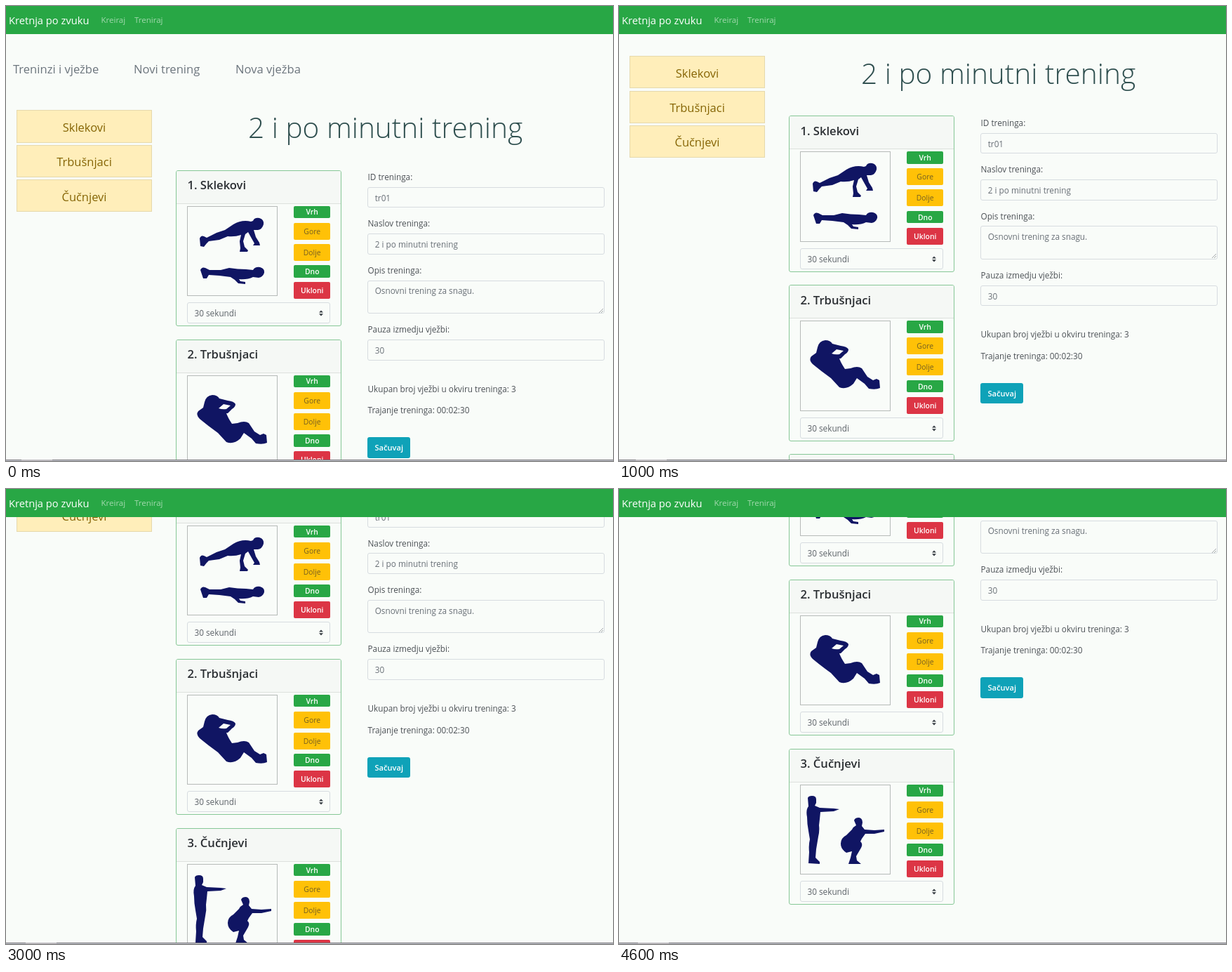
An HTML page for the animation above (5000 ms loop, 865 px wide and 648 px high).

```html
<!DOCTYPE html>
<html lang="hr">
<head>
<meta charset="utf-8">
<title>Trening</title>
<style>
  html, body { margin: 0; width: 100%; height: 100%; overflow: hidden; background: #f9fcf9; }
  #stage { position: absolute; left: 0; top: 0; width: 865px; height: 648px; overflow: hidden;
    font: 11.78px/20px "Open Sans", "Noto Sans", sans-serif; color: #4c5156; }
  #stage div { position: absolute; box-sizing: border-box; white-space: nowrap; }
  #page { left: 0; top: 0; width: 865px; height: 900px; }
  #nav { left: 0; top: 0; width: 865px; height: 40px; background: #28a745; }
  #line { left: 0; top: 646px; width: 865px; height: 2px; background: #c6c9d0; border-top: 1px solid #77747b; }
  #thumb { top: 646px; width: 44px; height: 2px; background: #bdbabf; }
  .brand { font-size: 14.7px; color: #fff; }
  .link { font-size: 11.5px; color: #a2d9ae; }
  .tab { font-size: 16.6px; color: #6c757d; }
  .title { font-size: 40.6px; font-weight: 300; color: #2f4f4f; }
  .pick { background: #ffeeba; border: 1px solid #e6d9ac; }
  .pickText { width: 193px; text-align: center; font-size: 16.5px; color: #856404; }
  .card { border: 1px solid #86c796; border-radius: 3px; background: #f9fcf9; }
  .head { background: #f5f8f5; border-bottom: 1px solid #dde1dd; border-radius: 2px 2px 0 0; }
  .name { font-size: 16.6px; font-weight: 600; color: #2b2f33; }
  .pic { border: 1px solid #b6bab8; }
  .pic svg { position: absolute; left: -1px; top: -1px; fill: #101563; }
  .btn { border-radius: 2px; }
  .btnText { width: 52.4px; text-align: center; font-size: 10.4px; }
  .field { border: 1px solid #d7dce0; border-radius: 3px; }
  .value { color: #697077; }
  .save { background: #0fa2b8; border-radius: 3px; }
  .saveText { width: 61px; text-align: center; font-size: 11.1px; font-weight: 600; color: #fff; }
</style>
</head>
<body>
<div id="stage">
  <div id="page"></div>
  <div id="nav"></div>
  <div id="line"></div>
  <div id="thumb"></div>
</div>
<script>
const page = document.getElementById('page');
const nav = document.getElementById('nav');
const thumb = document.getElementById('thumb');

function box(parent, cls, x, y, w, h) {
  const el = document.createElement('div');
  el.className = cls;
  Object.assign(el.style, { left: x + 'px', top: y + 'px', width: w + 'px', height: h + 'px' });
  parent.append(el);
  return el;
}

// y is the vertical middle of the line
function text(parent, cls, x, y, str) {
  const el = document.createElement('div');
  el.className = cls;
  el.textContent = str;
  Object.assign(el.style, { left: x + 'px', top: y - 10 + 'px' });
  parent.append(el);
  return el;
}

const svg = (w, h, d) =>
  `<svg width="${w}" height="${h}" viewBox="0 0 ${w} ${h}"><path fill-rule="evenodd" d="${d}"/></svg>`;

const pushUp =
  'M18 46Q20 41 24 43L28 45L42 38L54 34L66 26Q78 19 91 22L94 21Q96 16 103 17Q110 19 109 26' +
  'Q107 33 101 34L95 34L98 44L103 52L104 56L94 56L96 53L92 46L87 37L83 40L80 50L82 58L87 63L86 65' +
  'L75 65L76 60L75 50L77 41Q68 44 58 43L46 48L31 50L28 53L24 58L19 57Z' +
  'M19 91Q21 86 26 88L32 91L48 91L60 88Q72 90 84 90L94 91Q97 86 104 87Q111 89 110 95' +
  'Q108 101 102 102L94 101Q86 105 74 104L76 107L83 108L83 111L73 110L68 105L62 101L46 99' +
  'L31 98L28 103L23 103Z';
const sitUp =
  'M25 38Q27 29 36 28Q43 28 46 33L58 36Q67 37 69 41Q69 45 64 48L58 54L56 54Q58 60 64 69' +
  'L72 68Q82 64 88 68L96 80L104 85L109 83L113 85L114 96Q108 99 98 97L92 90L81 82L76 90' +
  'Q66 99 56 95L44 82Q30 72 18 62Q12 56 16 51L23 46ZM45 47L52 41L62 43L56 48Q50 49 45 47Z';
const squat =
  'M11 19Q12 16 17 16Q23 16 23 21L23 26L21 30L28 33L48 34L56 35L48 38L29 39Q28 50 27 58' +
  'Q28 66 26 74L23 92L22 104L28 110L28 113L12 112L13 96Q12 86 14 78L12 66Q10 56 10 46Q8 36 12 31Z' +
  'M77 51Q78 47 84 47Q89 48 89 54L88 59L92 64L106 65L120 64L120 67L106 70L93 70L88 77L86 81' +
  'Q90 84 87 90L80 102L81 108L87 113L69 113L72 104L74 95L66 97Q58 92 58 84Q58 76 66 72L74 64Q76 60 80 58Z';

const exercises = [['Sklekovi', pushUp], ['Trbušnjaci', sitUp], ['Čučnjevi', squat]];

// label, top, height, background, text colour, weight
const buttons = [
  ['Vrh', 51, 17.5, '#28a745', '#fff', 600],
  ['Gore', 75, 24, '#ffc107', '#755f22', 400],
  ['Dolje', 105, 24, '#ffc107', '#755f22', 400],
  ['Dno', 135.5, 17.5, '#28a745', '#fff', 600],
  ['Ukloni', 159.5, 24, '#dc3545', '#fff', 600]
];

function addCard(i, [name, figure]) {
  const x = 242, y = 233.6 + 241 * i;
  box(page, 'card', x, y, 236, 222.7);
  box(page, 'head', x + 1, y + 1, 234, 47);
  text(page, 'name', x + 16.5, y + 21.6, `${i + 1}. ${name}`);
  box(page, 'pic', x + 15.5, y + 51, 129, 128.6).innerHTML = svg(129, 128, figure);
  for (const [label, top, h, bg, color, weight] of buttons) {
    box(page, 'btn', x + 168, y + top, 52.4, h).style.background = bg;
    const t = text(page, 'btnText', x + 168, y + top + h / 2, label);
    t.style.color = color;
    t.style.fontWeight = weight;
  }
  const select = box(page, 'field', x + 16, y + 188.5, 204.4, 29.6);
  text(page, 'value', x + 26.5, y + 203.5, '30 sekundi').style.color = '#5c6268';
  const arrows = box(select, '', 186, 10, 8, 9);
  arrows.innerHTML = svg(8, 9, 'M1 3.6L4 .4L7 3.6ZM1 5.2L4 8.4L7 5.2Z');
  arrows.firstChild.style.cssText = 'display:block;fill:#343a40';
}

function addField(label, value, labelY, top, h) {
  text(page, '', 515.5, labelY, label);
  const field = box(page, 'field', 515.3, top, 338, h);
  text(page, 'value', 525.7, top + 14.9, value);
  return field;
}

text(nav, 'brand', 4, 19.5, 'Kretnja po zvuku');
text(nav, 'link', 135.5, 19.5, 'Kreiraj');
text(nav, 'link', 183, 19.5, 'Treniraj');

text(page, 'tab', 10, 90, 'Treninzi i vježbe');
text(page, 'tab', 182, 90, 'Novi trening');
text(page, 'tab', 327, 90, 'Nova vježba');
text(page, 'title', 345, 173.4, '2 i po minutni trening');

exercises.forEach((exercise, i) => {
  const y = 148.4 + 49.4 * i;
  box(page, 'pick', 15, y, 193, 46.2);
  text(page, 'pickText', 15, y + 24.3, exercise[0]);
  addCard(i, exercise);
});

addField('ID treninga:', 'tr01', 243, 257.9, 29.6);
addField('Naslov treninga:', '2 i po minutni trening', 309.3, 324.2, 29.6);
const area = addField('Opis treninga:', 'Osnovni trening za snagu.', 375.7, 390.5, 47.7);
addField('Pauza izmedju vježbi:', '30', 460.2, 475, 29.6);

const grip = box(area, '', 328, 38, 8, 8);
grip.innerHTML = svg(8, 8, 'M1 7L7 1M4 7L7 4');
grip.firstChild.style.cssText = 'display:block;stroke:#8d9296;stroke-width:.8';

text(page, '', 515.5, 544.6, 'Ukupan broj vježbi u okviru treninga: 3');
text(page, '', 515.5, 575.4, 'Trajanje treninga: 00:02:30');
box(page, 'save', 515.3, 614.4, 61, 29.2);
text(page, 'saveText', 515.3, 629.3, 'Sačuvaj');

// one step per second: page scroll, left edge of the light strip
const steps = [[0, 22], [77.2, 24], [155.2, 26], [232.8, 28], [346, 27]];

function draw() {
  const [scroll, left] = steps[Math.floor(performance.now() % 5000 / 1000)];
  page.style.top = -scroll + 'px';
  thumb.style.left = left + 'px';
  requestAnimationFrame(draw);
}
draw();
</script>
</body>
</html>
```
